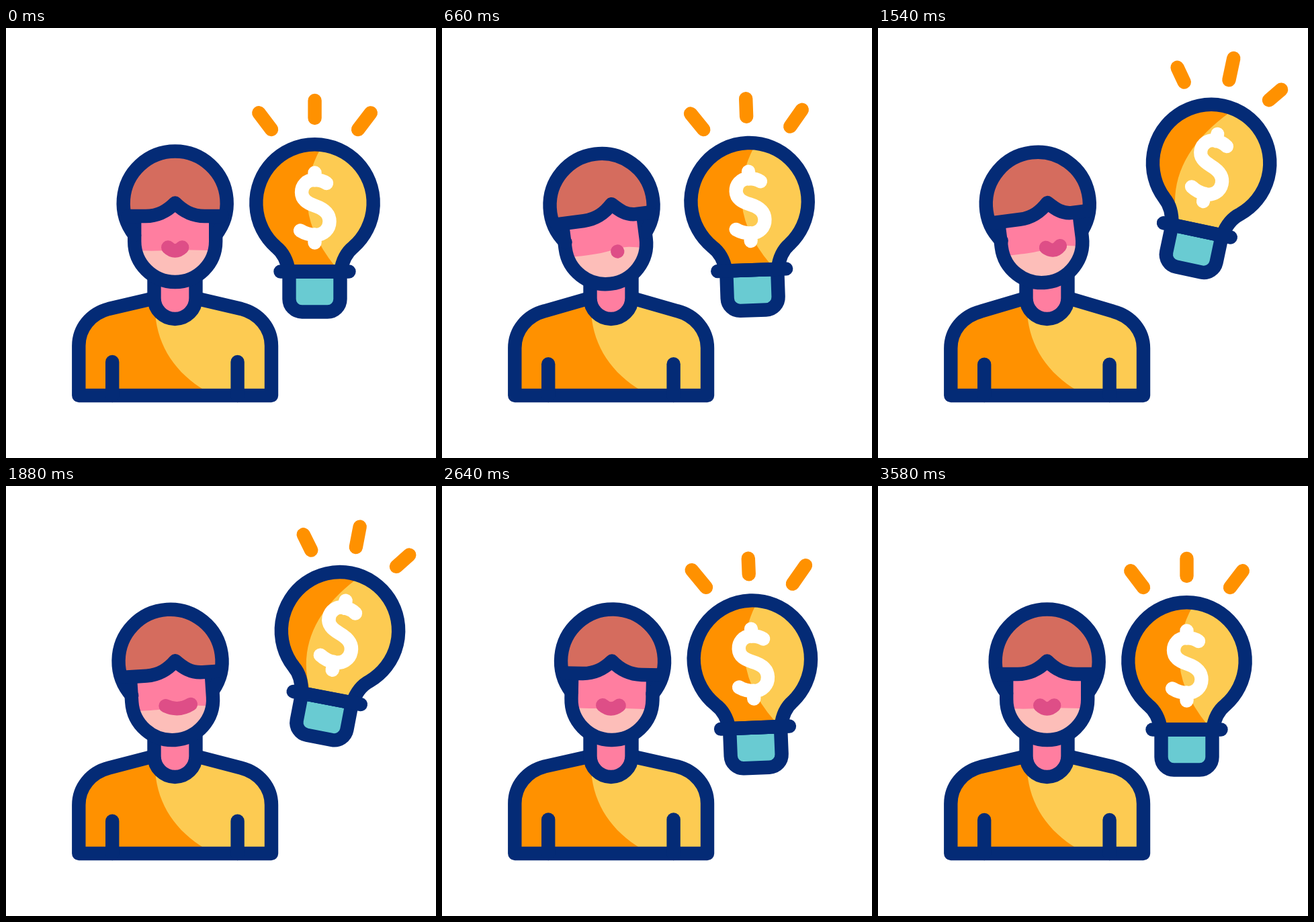
An HTML page with a canvas for the animation above (3600 ms loop, 640 by 640 pixels).

```html
<!DOCTYPE html>
<html lang="en">
<head>
<meta charset="utf-8">
<title>Bright idea</title>
<style>
  html, body { margin: 0; width: 100%; height: 100%; overflow: hidden; background: #fff; }
  canvas { display: block; width: 640px; height: 640px; }
</style>
</head>
<body>
<canvas id="stage" width="640" height="640"></canvas>
<script>
const ctx = document.getElementById('stage').getContext('2d');
const LOOP = 3600;
const LINE = 20.4;
const NAVY = '#042b76', ORANGE = '#ff9100', YELLOW = '#fdcb52', TEAL = '#69cbd2';
const HAIR = '#d56c5e', PINK = '#ff7ea0', BLUSH = '#fdbeb9', LIPS = '#de4e87';

const progress = (t, from, to) => Math.min(1, Math.max(0, (t - from) / (to - from)));

function ease(t, from, to) {
  const u = progress(t, from, to);
  return u * u * (3 - 2 * u);
}

// Eases up to 1, stays, and eases back to 0.
const hold = (t, in0, in1, out0, out1) => ease(t, in0, in1) - ease(t, out0, out1);

// Sine swing inside a time span, zero outside it.
const wave = (t, from, to, turns = 1) => Math.sin(progress(t, from, to) * turns * 2 * Math.PI);

function poseAt(t) {
  const sway = wave(t, 0, 900);
  const settle = wave(t, 2040, 3560);
  const bounce = wave(t, 2200, 2960) * (1 - progress(t, 2200, 2960));
  const away = hold(t, 0, 760, 1400, 2340);
  const smile = hold(t, 1300, 1880, 1880, 2960);
  const tilt = hold(t, 560, 1140, 1740, 2480);
  const lift = hold(t, 560, 1140, 1600, 2400);
  const glide = hold(t, 1100, 1740, 1740, 2300);
  return {
    headTurn: -7.7 * away + 2 * settle,
    headDrop: 2.6 * hold(t, 0, 660, 700, 1880),
    faceShift: 15.5 * away - 2 * settle,
    mouth: 10.5 * (1 - hold(t, 0, 560, 1250, 1700)) + 8.2 * smile,
    shoulder: 5 * hold(t, 0, 1100, 1160, 2340) - settle,
    bulbX: 459.5 + 3 * sway + 13.5 * tilt + 30 * glide + 2.5 * wave(t, 2040, 3560, 0.5),
    bulbY: 260.5 - 2 * sway - 52.5 * lift - 9 * glide + 14 * bounce,
    bulbTurn: 3 * sway + 12 * tilt - 3.8 * settle,
    rays: 7 * lift - 4 * settle,
    coin: 1 - 0.06 * (lift - glide),
    shineTop: 8 + 15 * lift * (1 - glide),
    shineMid: -7 - 12 * lift - 31 * glide,
    shineEnd: 30 - 28 * lift - 45 * glide
  };
}

function fill(path, color) {
  ctx.fillStyle = color;
  ctx.fill(path);
}

function stroke(path, color = NAVY) {
  ctx.strokeStyle = color;
  ctx.lineWidth = LINE;
  ctx.stroke(path);
}

function line(x1, y1, x2, y2, color) {
  stroke(new Path2D(`M${x1} ${y1}L${x2} ${y2}`), color);
}

function clipped(path, draw) {
  ctx.save();
  ctx.clip(path);
  draw();
  ctx.restore();
}

function placed(x, y, degrees, draw) {
  ctx.save();
  ctx.translate(x, y);
  ctx.rotate(degrees * Math.PI / 180);
  draw();
  ctx.restore();
}

const bodyShine = new Path2D('M222 400 V425 C226 475 253 514 297 540 V560 H420 V400Z');
const neck = new Path2D('M220.5 365 V402 A31 31 0 0 0 282.5 402 V365');
const face = new Path2D('M-60.5 0 V57 A60.5 60.5 0 0 0 60.5 57 V0Z');
const faceLine = new Path2D('M-60.5 20 V57 A60.5 60.5 0 0 0 60.5 57 V20');
const scalp = new Path2D('M-60.5 47.6 A77 77 0 1 1 60.5 47.6');
const glass = new Path2D('M-38.5 102 C-41 86 -48 73 -57.5 65.5 A87.2 87.2 0 1 1 57.5 65.5 C48 73 41 86 38.5 102Z');
const base = new Path2D('M-38 102 V143 A19 19 0 0 0 -19 162 H19 A19 19 0 0 0 38 143 V102Z');
const dollar = new Path2D('M17.5 -29.5 C12 -33.5 6 -34.5 -1 -34.5 C-12 -34.5 -19.5 -26 -19.5 -16 C-19.5 -5 -11 0 0 4 C13 8.5 22 15 22 27.5 C22 39 13 47.5 1 47.5 C-8 47.5 -15 45 -21.5 41 M0 -45 V-34 M0 47 V59');

function drawBody(drop) {
  const elbow = 418 + drop, side = 473 + drop;
  const torso = new Path2D(`M108.3 547 V${side} C108.3 ${447 + drop} 126 ${425 + drop} 153 ${elbow}
    L213 404 H290 L350 ${elbow} C377 ${425 + drop} 395 ${447 + drop} 395 ${side} V547Z`);
  fill(torso, ORANGE);
  clipped(torso, () => fill(bodyShine, YELLOW));
  stroke(torso);
  for (const x of [158.2, 344.6]) line(x, 497 + drop, x, 547);
  fill(neck, PINK);
  stroke(neck);
}

function drawFace(shift) {
  const chin = new Path2D(`M-65 70 C${shift - 40} 72 ${shift - 20} 71 ${shift} ${70 - shift * 0.2}
    S45 70.5 65 71 V140 H-65Z`);
  fill(face, PINK);
  clipped(face, () => fill(chin, BLUSH));
  stroke(faceLine);
}

function drawMouth(x, reach) {
  const dip = 5 * Math.min(1, reach / 8);
  stroke(new Path2D(`M${x - reach} ${71 - dip} Q${x} ${71 + dip} ${x + reach + 0.01} ${71 - dip}`), LIPS);
}

function drawHair(shift) {
  const fringe = `L${shift - 44} 19.5 C${shift - 24} 19.5 ${shift - 11} 11 ${shift} 0
    C${shift + 11} 11 ${24 + shift * 0.7} 19.5 ${44 + shift * 0.4} 19.5`;
  fill(new Path2D(`M-74.5 19.5 ${fringe} L74.5 19.5 A77 77 0 1 0 -74.5 19.5Z`), HAIR);
  stroke(scalp);
  stroke(new Path2D(`M-70 19.5 ${fringe} L70 19.5`));
}

function drawHead({ faceShift, mouth }) {
  placed(-faceShift * 0.08, 0, 0, () => drawFace(faceShift));
  drawMouth(faceShift, mouth);
  drawHair(faceShift);
}

// The inner ends stay put; the middle ray grows while the side rays shrink.
function drawRays(stretch) {
  line(0, -126.5, 0, -152.5 - stretch, ORANGE);
  const length = 31 - stretch;
  for (const side of [-1, 1]) {
    line(side * 64.5, -109.5, side * (64.5 + 0.605 * length), -109.5 - 0.796 * length, ORANGE);
  }
}

function drawBulb({ rays, coin, shineTop, shineMid, shineEnd }) {
  drawRays(rays);
  fill(base, TEAL);
  stroke(base);
  fill(glass, ORANGE);
  // Control point that makes the edge of the shine pass through shineMid.
  const bend = (shineMid - 0.16 * shineTop - 0.36 * shineEnd) / 0.48;
  clipped(glass, () => fill(new Path2D(
    `M${shineTop} -100 V-80 Q${bend} 8.3 ${shineEnd} 94 V110 H110 V-100Z`), YELLOW));
  stroke(glass);
  line(-51, 102, 51, 102);
  ctx.translate(0, 7);
  ctx.scale(coin, coin);
  ctx.translate(0, -7);
  stroke(dollar, '#fff');
}

function render(t) {
  const pose = poseAt(t);
  ctx.fillStyle = '#fff';
  ctx.fillRect(0, 0, 640, 640);
  ctx.lineCap = ctx.lineJoin = 'round';
  drawBody(pose.shoulder);
  placed(251.7, 371.5 + pose.headDrop, pose.headTurn, () => {
    ctx.translate(0, -111);
    drawHead(pose);
  });
  placed(pose.bulbX, pose.bulbY, pose.bulbTurn, () => drawBulb(pose));
}

const start = performance.now();
function tick() {
  render((performance.now() - start) % LOOP);
  requestAnimationFrame(tick);
}
tick();
</script>
</body>
</html>
```
